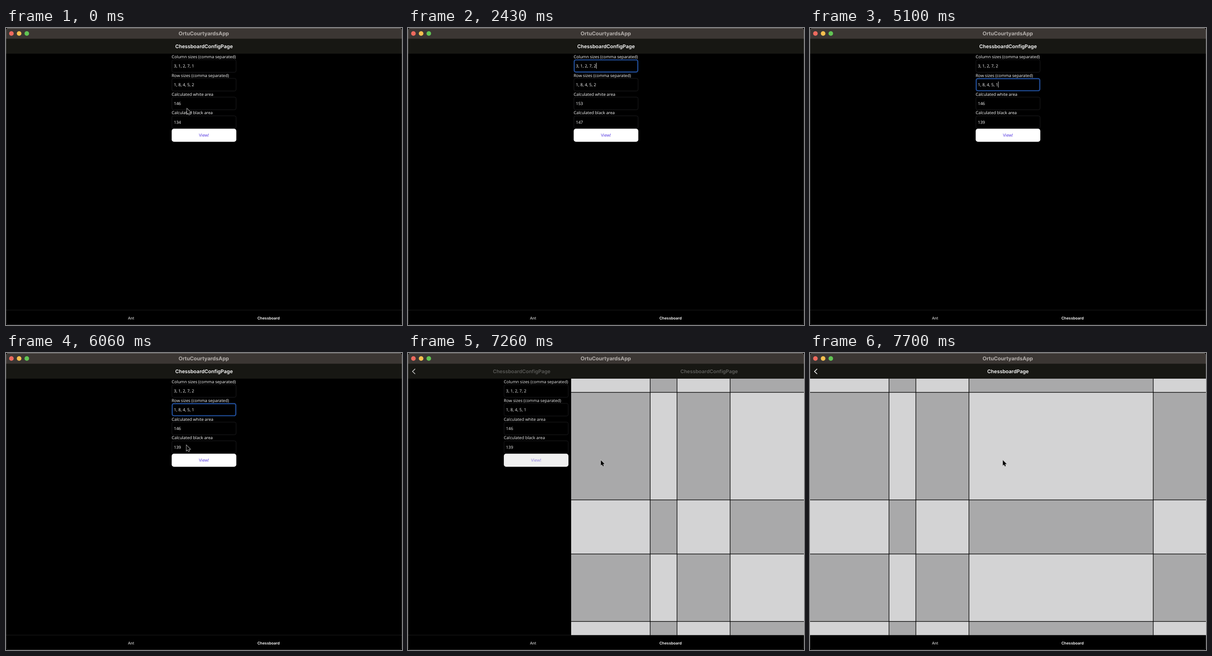
These frames come from a looping animation (864 px wide and 648 px high, 8 s). An HTML page with a canvas:

```html
<!DOCTYPE html>
<html lang="en">
<head>
<meta charset="utf-8">
<title>Chessboard areas</title>
<style>
  html, body { margin: 0; width: 100%; height: 100%; overflow: hidden; background: #000; }
  canvas { display: block; width: 864px; height: 648px; }
</style>
</head>
<body>
<canvas id="stage" width="864" height="648"></canvas>
<script>
const ctx = document.getElementById('stage').getContext('2d');
const W = 864, H = 648, LOOP = 8000;
const NAV_TOP = 24, PAGE_TOP = 56, PAGE_BOTTOM = 615.5;
const BODY_FONT = '9.08px "Open Sans", "Noto Sans", sans-serif';
const NAV_FONT = '600 10.92px Inter, sans-serif';

const PUSH_START = 7147, PUSH_END = 7690;
const CARET_ON = [[1200, 1730], [1930, 2960], [3400, 5660], [6170, 6760]];
const POINTER_HIDDEN = [[1930, 3330], [4700, 5660]];
const ERRORS = [[1930, 2430], [4700, 5100]];
const POINTER_PATH = [
  [30, 395, 176], [560, 427, 78], [730, 427, 78], [850, 427, 73],
  [960, 426, 82], [1160, 426, 82], [1360, 460, 79.5], [3330, 460, 79.5],
  [3700, 441, 140], [3930, 435, 122.5], [5660, 435, 122.5],
  [6060, 393.7, 201.5], [6460, 420, 234], [6500, 420, 234], [6530, 420.8, 234]
];

const within = (t, spans) => spans.some(([a, b]) => t >= a && t < b);
const clamp = v => Math.max(0, Math.min(1, v));

function rect(x, y, w, h, color) {
  ctx.fillStyle = color;
  ctx.fillRect(x, y, w, h);
}

function roundRect(x, y, w, h, r) {
  ctx.beginPath();
  ctx.roundRect(x, y, w, h, r);
}

function text(str, x, y, font, color, align = 'left', alpha = 1) {
  ctx.globalAlpha = alpha;
  ctx.font = font;
  ctx.fillStyle = color;
  ctx.textAlign = align;
  ctx.fillText(str, x, y);
  ctx.globalAlpha = 1;
}

function stroke(color, width) {
  ctx.strokeStyle = color;
  ctx.lineWidth = width;
  ctx.stroke();
}

// Remaining share of the page push, as a critically damped spring.
function pushRemaining(t) {
  if (t < 7160) return 1;
  if (t >= PUSH_END) return 0;
  const s = (t - PUSH_START) * 0.01735;
  return (1 + s) * Math.exp(-s);
}

function formState(t) {
  const columns = '3, 1, 2, 7, ' + (t < 1930 ? '1' : t < 2430 ? '' : '2');
  const rows = '1, 8, 4, 5, ' + (t < 4700 ? '2' : t < 5100 ? '' : '1');
  const [white, black] = t < 2430 ? [146, 134] : t < 5100 ? [153, 147] : [146, 139];
  const focus = t < 1160 || t >= 7160 ? -1 : t < 4130 ? 0 : 1;
  return { values: [columns, rows, String(white), String(black)], focus };
}

function drawEntry(x, y, w, value, focused, caret) {
  roundRect(x + 0.5, y + 0.5, w - 1, 27.6, 3.5);
  stroke('#1d1d1f', 1);
  if (focused) {
    roundRect(x + 1.2, y + 1.1, w - 2.4, 26.4, 3.5);
    stroke('#1f4b95', 2.4);
  }
  text(value, x + 4.7, y + 17.7, BODY_FONT, '#fff');
  if (focused && caret) {
    rect(x + 4.7 + ctx.measureText(value).width, y + 7.4, 1, 13, '#d8d8d8');
  }
}

function drawForm(t, shift) {
  const error = within(t, ERRORS);
  const w = error ? 195.6 : 141;
  const x = 432 - w / 2 + shift;
  const { values, focus } = formState(t);
  const labels = ['Column sizes (comma separated)', 'Row sizes (comma separated)',
    'Calculated white area', 'Calculated black area'];

  labels.forEach((label, i) => {
    const y = 56.2 + i * 40.9;
    text(label, x, y + 9.5, BODY_FONT, '#fff');
    drawEntry(x, y + 12.3, w, values[i], focus === i, within(t, CARET_ON));
  });

  roundRect(x, 219.8, w, 28.5, 5);
  ctx.fillStyle = '#fff';
  ctx.fill();
  text('View!', x + w / 2, 237.4, BODY_FONT, '#4a2bdf', 'center', t >= 6960 ? 0.6 : 1);
  if (error) {
    text("The input string ' ' was not in a correct format.", x, 257.9, BODY_FONT, '#f00');
  }
}

function splitTrack(sizes, start, length, gap) {
  const total = sizes.reduce((a, b) => a + b);
  const unit = (length - gap * (sizes.length - 1)) / total;
  let pos = start;
  return sizes.map(size => {
    const cell = { pos, size: size * unit };
    pos += cell.size + gap;
    return cell;
  });
}

function drawBoard(left) {
  rect(left, PAGE_TOP, W, PAGE_BOTTOM - PAGE_TOP, '#000');
  const cols = splitTrack([3, 1, 2, 7, 2], left, W, 1.3);
  const rows = splitTrack([1, 8, 4, 5, 1], PAGE_TOP, PAGE_BOTTOM - PAGE_TOP, 1.3);
  rows.forEach((row, r) => cols.forEach((col, c) => {
    rect(col.pos, row.pos, col.size, row.size, (r + c) % 2 ? '#a9a9aa' : '#d3d3d4');
  }));
}

function drawNav(t, rest) {
  rect(0, NAV_TOP, W, PAGE_TOP - NAV_TOP, '#171713');
  const done = 1 - rest;
  const title = (str, x, alpha) => text(str, x, 43.8, NAV_FONT, '#fff', 'center', alpha);
  if (rest === 1) {
    title('ChessboardConfigPage', 432, 1);
    return;
  }
  if (rest === 0) {
    title('ChessboardPage', 432, 1);
  } else {
    title('ChessboardConfigPage', 432 - 313 * done, clamp((rest - 0.17) / 0.83));
    title('ChessboardConfigPage', 432 + W * rest * (0.522 + 0.267 * rest), clamp((done - 0.4) / 0.6));
  }
  ctx.globalAlpha = clamp(done * 1.3);
  ctx.beginPath();
  ctx.moveTo(15.6, 34.6);
  ctx.lineTo(9.8, 40.2);
  ctx.lineTo(15.6, 45.8);
  stroke('#fff', 1.5);
  ctx.globalAlpha = 1;
}

function drawWindow() {
  rect(0, 0, W, NAV_TOP, '#3b3633');
  rect(0, 0, W, 1, '#5b5653');
  rect(0, NAV_TOP - 1, W, 1, '#24211e');
  ['#ed6a5e', '#f5bf4f', '#61c554'].forEach((color, i) => {
    ctx.beginPath();
    ctx.arc(11.8 + i * 16.8, 12, 5, 0, Math.PI * 2);
    ctx.fillStyle = color;
    ctx.fill();
  });
  text('OrtuCourtyardsApp', 431.5, 15.5, '700 11.3px Inter, sans-serif', '#b5b0ad', 'center');

  rect(0, 616, W, H - 616, '#000');
  text('Ant', 272.8, 636, '500 8.3px Inter, sans-serif', '#d2d2d2', 'center');
  text('Chessboard', 572.8, 636, '600 8.3px Inter, sans-serif', '#fff', 'center');
}

function pointerAt(t) {
  const next = POINTER_PATH.findIndex(p => p[0] > t);
  if (next === 0) return POINTER_PATH[0].slice(1);
  if (next < 0) return POINTER_PATH[POINTER_PATH.length - 1].slice(1);
  const [t0, x0, y0] = POINTER_PATH[next - 1];
  const [t1, x1, y1] = POINTER_PATH[next];
  const k = (t - t0) / (t1 - t0);
  const e = k * k * (3 - 2 * k);
  return [x0 + (x1 - x0) * e, y0 + (y1 - y0) * e];
}

function drawArrow() {
  const outline = [[0, 0], [0, 11.6], [2.6, 9.2], [4.4, 13.2], [6.3, 12.4], [4.6, 8.4], [8.2, 8.2]];
  ctx.beginPath();
  outline.forEach(([x, y]) => ctx.lineTo(x, y));
  ctx.closePath();
  stroke('#c8c8c8', 1.7);
  ctx.fillStyle = '#000';
  ctx.fill();
}

function drawBeam() {
  ctx.beginPath();
  for (const s of [-1, 1]) {
    ctx.moveTo(-3, s * 7.3);
    ctx.quadraticCurveTo(0, s * 7.3, 0, s * 5);
    ctx.quadraticCurveTo(0, s * 7.3, 3, s * 7.3);
  }
  ctx.moveTo(0, -6);
  ctx.lineTo(0, 6);
  ctx.moveTo(-1.8, 1.8);
  ctx.lineTo(1.8, 1.8);
  stroke('#b4b4b4', 2.9);
  stroke('#1c1c1c', 1);
}

function drawPointer(t) {
  if (within(t, POINTER_HIDDEN)) return;
  const [x, y] = pointerAt(t);
  const overEntry = (y > 69 && y < 97) || (y > 110 && y < 138);
  ctx.save();
  ctx.translate(x, y);
  overEntry ? drawBeam() : drawArrow();
  ctx.restore();
}

function draw(t) {
  const rest = pushRemaining(t);
  ctx.textRendering = 'geometricPrecision';
  rect(0, 0, W, H, '#000');
  ctx.save();
  roundRect(0, 0, W, H, 5);
  ctx.clip();

  rect(0, 615, W, 1, '#1b1b1b');
  if (rest > 0) drawForm(t, -0.3 * W * (1 - rest));
  if (rest < 1) {
    rect(0, PAGE_TOP, W, PAGE_BOTTOM - PAGE_TOP, `rgba(0,0,0,${0.1 * (1 - rest)})`);
    drawBoard(W * rest);
  }
  drawWindow();
  drawNav(t, rest);
  roundRect(0.5, 0.5, W - 1, H - 1, 5);
  stroke('rgba(255,255,255,0.18)', 1);
  ctx.restore();
  drawPointer(t);
}

const start = performance.now();
function tick() {
  draw((performance.now() - start) % LOOP);
  requestAnimationFrame(tick);
}
tick();
</script>
</body>
</html>
```
